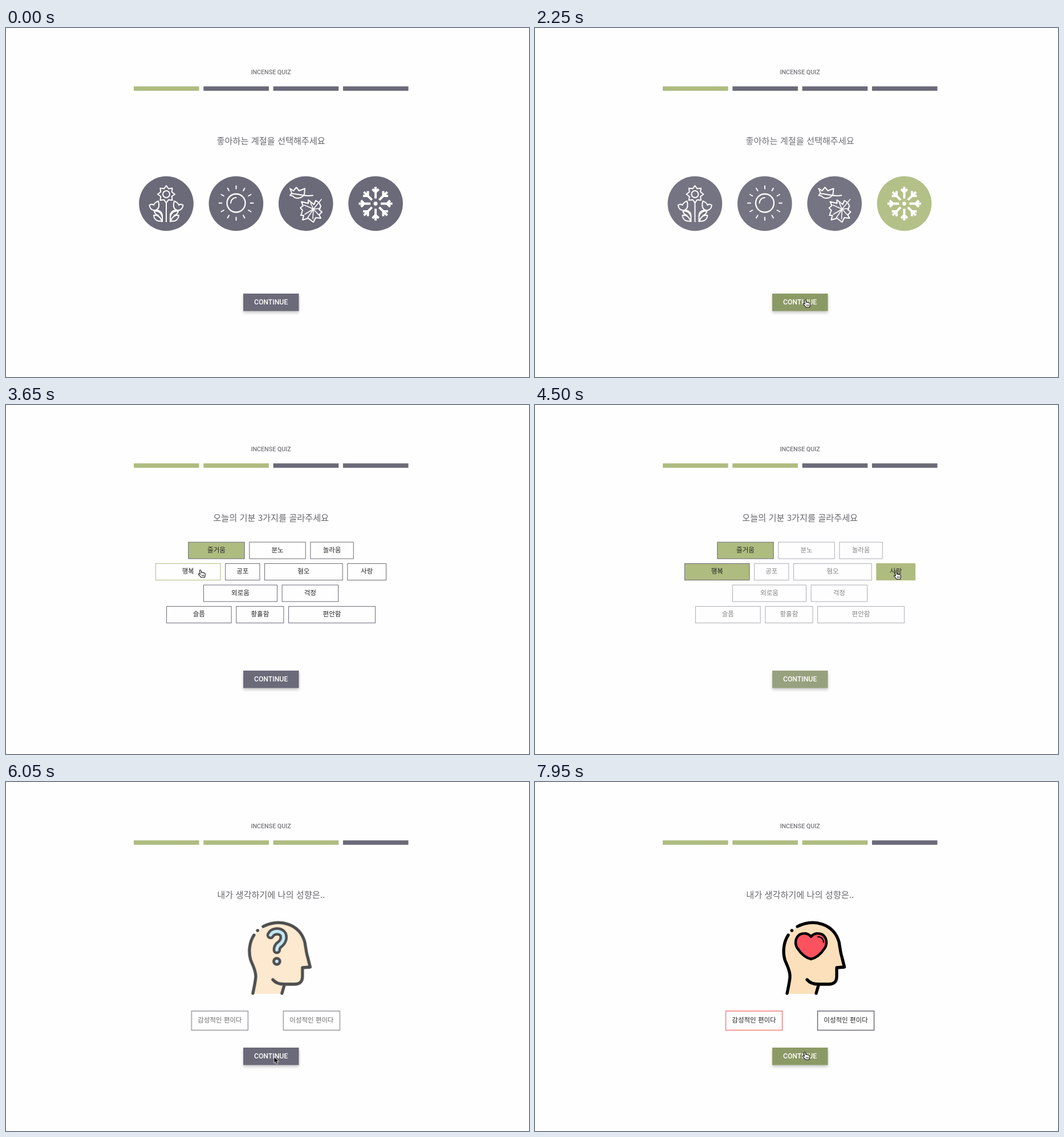
These frames come from a looping animation (917 px wide and 611 px high, 8000 ms). An HTML page:

```html
<!DOCTYPE html>
<html lang="ko">
<head>
<meta charset="utf-8">
<style>
html, body { margin: 0; width: 100%; height: 100%; overflow: hidden; background: #fefefe; }
svg { display: block; }
text { text-anchor: middle; font: 11.5px "Noto Sans CJK KR", "Noto Sans CJK JP", sans-serif; fill: #222; }
.title { font-size: 15.2px; fill: #66656c; }
.latin { font-family: Roboto, sans-serif; font-weight: 500; }
.line { fill: none; stroke: #fff; stroke-width: 2; stroke-linecap: round; stroke-linejoin: round; }
.ink { fill: none; stroke: #000; stroke-width: 5.3; stroke-linecap: round; stroke-linejoin: round; }
#button { filter: drop-shadow(0 3px 2.5px rgba(0, 0, 0, .22)); }
</style>
</head>
<body>
<svg width="917" height="611" viewBox="0 0 917 611">
  <text class="latin" x="464.6" y="80.8" style="font-size:10.7px;fill:#78777c">INCENSE QUIZ</text>
  <g id="bars"></g>
  <text class="title" x="464.7" y="202.6">좋아하는 계절을 선택해주세요</text>
  <text class="title" x="464.7" y="202.6">오늘의 기분 3가지를 골라주세요</text>
  <text class="title" x="464.7" y="202.6">내가 생각하기에 나의 성향은..</text>

  <g class="page">
    <g id="discs"></g>
    <g class="line" transform="translate(281 307)">
      <path id="bloom"/>
      <circle cy="-16" r="6"/>
      <path d="M0-1V32"/>
      <g id="sprig">
        <path d="M-29.5 3C-26 1-24 1-22 3C-21 0-17-3-14-4C-12 3-12 10-19 12C-26 13-29 8-29.5 3Z"/>
        <path d="M-18 12C-11 12-7 16-7 22V32M-7 24C-9 16-15 12-21 14C-20 18-18 20-14 21M-8 31C-10 23-16 20-22 21C-21 29-16 32-8 31"/>
      </g>
      <use href="#sprig" transform="scale(-1 1)"/>
    </g>
    <g class="line" transform="translate(403.5 306.5)">
      <circle r="16" stroke-width="2.3"/>
      <path d="M-9.5 0A9.5 9.5 0 0 1 0-9.5"/>
      <g id="rays"></g>
    </g>
    <g class="line">
      <path d="M498 281L504 285L509 279L514 285L524 281L523 291C519 299 507 300 503 294L498 293L501 289ZM501 290C513 290 523 296 538 293"/>
      <path d="M549 306L543 302L540 309L530 301L530 307L518 304L521 311L516 315L520 319L517 328L522 328L520 336L530 333L539 340L543 332L552 333L549 327L554 322L549 318L552 312Z"/>
      <path stroke-width="1.6" d="M553 300L539 317L523 310M539 317L524 326M539 317L538 334M539 317L548 327M539 317L534 306M539 317L529 332M539 317L551 316"/>
    </g>
    <g transform="translate(648 307.5)"><circle r="3.4" fill="#fff"/><g id="snow" class="line" stroke-linecap="butt"></g></g>
  </g>

  <g class="page" id="tiles"></g>

  <g class="page">
    <path fill="#fbe0bb" d="M442 371C444 360 449 348 446 334C440 319 435 310 436 295C437 275 445 262 460 254C490 238 524 249 533 280C535 291 536 301 538 306L543 324L529 325V340C529 350 524 354 515 354H497L493 371Z"/>
    <path class="ink" d="M460 253C490 238 524 249 533 280C535 291 536 301 538 306L542.5 324L529 325V340C529 350 524 354 515 354H497C488 354 481 351 477 346M497 356L493 370M444 268C436 280 434 297 438 311C441 320 448 330 447 342C446 352 444 360 442 370"/>
    <circle cx="450.3" cy="260" r="2.8"/>
    <g id="question" fill="none" stroke-linecap="round">
      <path id="hook" d="M473 268C477 260 490 259 495 267C498 275 493 282 487 286C484 289 484 291 484 294" stroke="#000" stroke-width="14.5"/>
      <path d="M473 268C477 260 490 259 495 267C498 275 493 282 487 286C484 289 484 291 484 294" stroke="#a5dcf0" stroke-width="5.5"/>
      <circle cx="484" cy="314" r="5.4" fill="#a5dcf0" stroke="#000" stroke-width="4.8"/>
    </g>
    <g id="heart">
      <path class="ink" style="fill:#fb5260;stroke-width:4.4" d="M484 271C479 264 470 264 464 267C456 273 455 283 460 291C466 300 475 308 484 310C493 308 502 300 508 291C513 283 512 273 504 267C498 264 489 264 484 271Z"/>
      <path class="ink" style="stroke-width:2.2" d="M496 271C502 271 506 275 506 281"/>
    </g>
    <g id="choices"></g>
  </g>

  <g id="button">
    <rect x="416" y="465" width="97.5" height="30.5"/>
  </g>
  <text class="latin" x="464.6" y="484.4" style="font-size:12.2px;fill:#fff">CONTINUE</text>

  <path id="arrow" d="M0 0V11.2L2.6 8.8L4.4 13L6.5 12.1L4.7 8.1H8.2Z" stroke="#fff" stroke-width=".8"/>
  <g id="hand" fill="#fff" stroke="#111" stroke-width="1.1" stroke-linejoin="round">
    <path d="M-1.6 1C-1.6-.6 .8-.6 1 1L1.6 4.4C2.4 3.4 3.6 3.6 4 4.8C5 4 6 4.4 6.3 5.3C7.4 4.9 8 5.6 8.2 6.6C8.6 9 8.3 10.5 7.3 13H1C0 11-2 9.5-3.6 7.8C-4.4 6.8-3 5.6-1.8 6.4L-.6 7.3Z"/>
    <path stroke-width=".7" d="M2.5 8V11M4.2 8V11M5.9 8V11"/>
  </g>
</svg>
<script>
const GREY = [107, 106, 121], GREEN = [174, 188, 128], DARK = [139, 154, 101], RED = [242, 128, 124];
const $ = id => document.getElementById(id);
const all = sel => [...document.querySelectorAll(sel)];
const clamp = v => Math.max(0, Math.min(1, v));
const ramp = (t, start, len = 150) => clamp((t - start) / len);
const easeOut = p => 1 - (1 - p) ** 2.3;
const mix = (a, b, p) => a.map((v, i) => v + (b[i] - v) * p);
const rgb = c => `rgb(${c.map(Math.round)})`;

function add(parent, tag, attrs, label) {
  const el = document.createElementNS("http://www.w3.org/2000/svg", tag);
  for (const k in attrs) el.setAttribute(k, attrs[k]);
  if (label) el.textContent = label;
  return parent.appendChild(el);
}

function box(parent, x, y, w, h, label, weight, line) {
  const g = add(parent, "g", {});
  const rect = add(g, "rect", { x: x + .5, y: y + .5, width: w - 1, height: h - 1, fill: "#fefefe", "stroke-width": line });
  add(g, "text", { x: x + w / 2, y: y + h / 2 + 3.1, "font-weight": weight, style: `font-weight:${weight}` }, label);
  const hit = (px, py) => px > x && px < x + w && py > y && py < y + h;
  return { g, rect, hit, label };
}

const bars = [0, 1, 2, 3].map(i => add($("bars"), "rect", { x: 224 + i * 122.3, y: 102.2, width: 114.6, height: 7.7 }));
const discs = [0, 1, 2, 3].map(i => add($("discs"), "circle", { cx: 281 + i * 122.35, cy: 307.4, r: 47.8, fill: rgb(GREY) }));

// Eight pointed petals around the flower's centre
let petals = "";
for (let i = 0; i <= 16; i++) {
  const a = (i - 1) * Math.PI / 8, r = i % 2 ? 15 : 10.5;
  petals += `${i ? "L" : "M"}${r * Math.sin(a)} ${-16 - r * Math.cos(a)}`;
}
$("bloom").setAttribute("d", petals + "Z");

for (let i = 0; i < 12; i++)
  add($("rays"), "path", { d: "M0-25V-30", transform: `rotate(${i * 30})` });
for (let i = 0; i < 8; i++)
  add($("snow"), "path", {
    d: i % 2 ? "M0-9V-29M-6-25L0-19L6-25" : "M0-9V-29.5M-5.5-25.5L0-20L5.5-25.5",
    style: "stroke-width:4;stroke-linecap:butt", transform: `rotate(${i * 45})`
  });

const rows = [
  [["즐거움", 99.4], ["분노", 99.4], ["놀라움", 76.4]],
  [["행복", 114.6], ["공포", 61.2], ["혐오", 137.6], ["사랑", 68.8]],
  [["외로움", 130], ["걱정", 99.4]],
  [["슬픔", 114.6], ["황홀함", 84.1], ["편안함", 152.9]]
];
const tiles = rows.flatMap((row, r) => {
  const gap = 7.64;
  let x = 464.5 - (row.reduce((sum, c) => sum + c[1] + gap, -gap)) / 2;
  return row.map(([label, w]) => {
    const tile = box($("tiles"), x, 239.6 + r * 37.5, w, 30, label, 400, 1);
    x += w + gap;
    return tile;
  });
});
const picked = { "즐거움": 3340, "행복": 3780, "사랑": 4380 };

const choices = [["감성적인 편이다", 334], ["이성적인 편이다", 495]]
  .map(([label, x]) => box($("choices"), x, 400.5, 100, 34.5, label, 500, 1.5));

const titles = all(".title"), pages = all(".page");
const ENTER = [-1000, 2382, 5850], LEAVE = [2240, 5400, 9000], CHOSEN = 6600;

// Pointer path: time, x, y
const path = [
  [700, 741, 560], [1100, 637, 314], [1480, 637, 314], [1850, 474, 476], [2260, 474, 476],
  [2500, 558, 477], [2650, 558, 477], [3050, 525, 356], [3280, 375, 252], [3430, 375, 252],
  [3650, 341, 289], [3930, 341, 289], [4350, 633, 292], [4520, 633, 292], [4770, 470, 478],
  [5200, 470, 478], [5450, 470, 481], [6230, 470, 481], [6540, 392, 414], [6980, 392, 414],
  [7500, 468, 470], [7900, 473, 473]
];

function pointer(t) {
  const i = path.findIndex(k => k[0] > t);
  if (i < 0) return path[path.length - 1].slice(1);
  if (!i) return path[0].slice(1);
  const [a, b] = [path[i - 1], path[i]];
  const p = (t - a[0]) / (b[0] - a[0]);
  return mix(a, b, p * p * (3 - 2 * p)).slice(1);
}

function draw(t) {
  const [x, y] = pointer(t);

  pages.forEach((page, i) => {
    const e = easeOut(ramp(t, ENTER[i], 500));
    const out = ramp(t, LEAVE[i], i ? 280 : 160);
    const dx = -30 * (1 - e) - (i ? 0 : 117 * out * out);
    page.setAttribute("transform", `translate(${dx} 0)`);
    page.setAttribute("opacity", e * (1 - out));
    titles[i].setAttribute("opacity", ramp(t, ENTER[i], 150) * (1 - out));
  });

  bars.forEach((bar, i) => {
    const p = i ? ramp(t, [0, 2382, 5850, 9000][i]) : 1;
    bar.setAttribute("fill", rgb(mix(GREY, GREEN, p)));
  });
  discs[3].setAttribute("fill", rgb(mix(GREY, GREEN, ramp(t, 1230))));

  const dim = ramp(t, 4380, 100);
  let hand = t < 2240 && Math.hypot(x - 648, y - 307) < 47;
  const onTiles = t > 2650 && t < 5350;
  for (const tile of tiles) {
    const time = picked[tile.label] ?? 9000;
    const p = ramp(t, time, 100);
    const hover = onTiles && tile.hit(x, y) && (time < 9000 || !dim);
    hand ||= hover;
    tile.rect.setAttribute("fill", rgb(mix([254, 254, 254], GREEN, p)));
    tile.rect.setAttribute("stroke", rgb(hover ? GREEN : GREY));
    tile.g.setAttribute("opacity", time < 9000 ? 1 : 1 - .45 * dim);
  }

  const chosen = ramp(t, CHOSEN, 100);
  $("question").setAttribute("opacity", t < CHOSEN ? 1 : 0);
  $("heart").setAttribute("opacity", t < CHOSEN ? 0 : 1);
  choices.forEach((c, i) => {
    c.rect.setAttribute("stroke", rgb(i ? GREY : mix(GREY, RED, chosen)));
    hand ||= t > 6100 && c.hit(x, y);
  });

  const active = ramp(t, 1250) - ramp(t, 2260, 250) + ramp(t, 4400) - ramp(t, 5450, 250) + chosen;
  const over = ramp(t, 1740) - ramp(t, 2260) + ramp(t, 4680) - ramp(t, 5450) + ramp(t, 7700, 200);
  $("button").setAttribute("fill", rgb(mix(GREY, mix(GREEN, DARK, over), active)));
  hand ||= active > .5 && x > 416 && x < 513.5 && y > 465 && y < 495.5;

  for (const id of ["arrow", "hand"]) {
    $(id).setAttribute("transform", `translate(${x} ${y})`);
    $(id).setAttribute("visibility", t >= 700 && (id === "hand") === hand ? "visible" : "hidden");
  }
}

const begin = performance.now();
function frame() {
  draw((performance.now() - begin) % 8000);
  requestAnimationFrame(frame);
}
frame();
</script>
</body>
</html>
```
